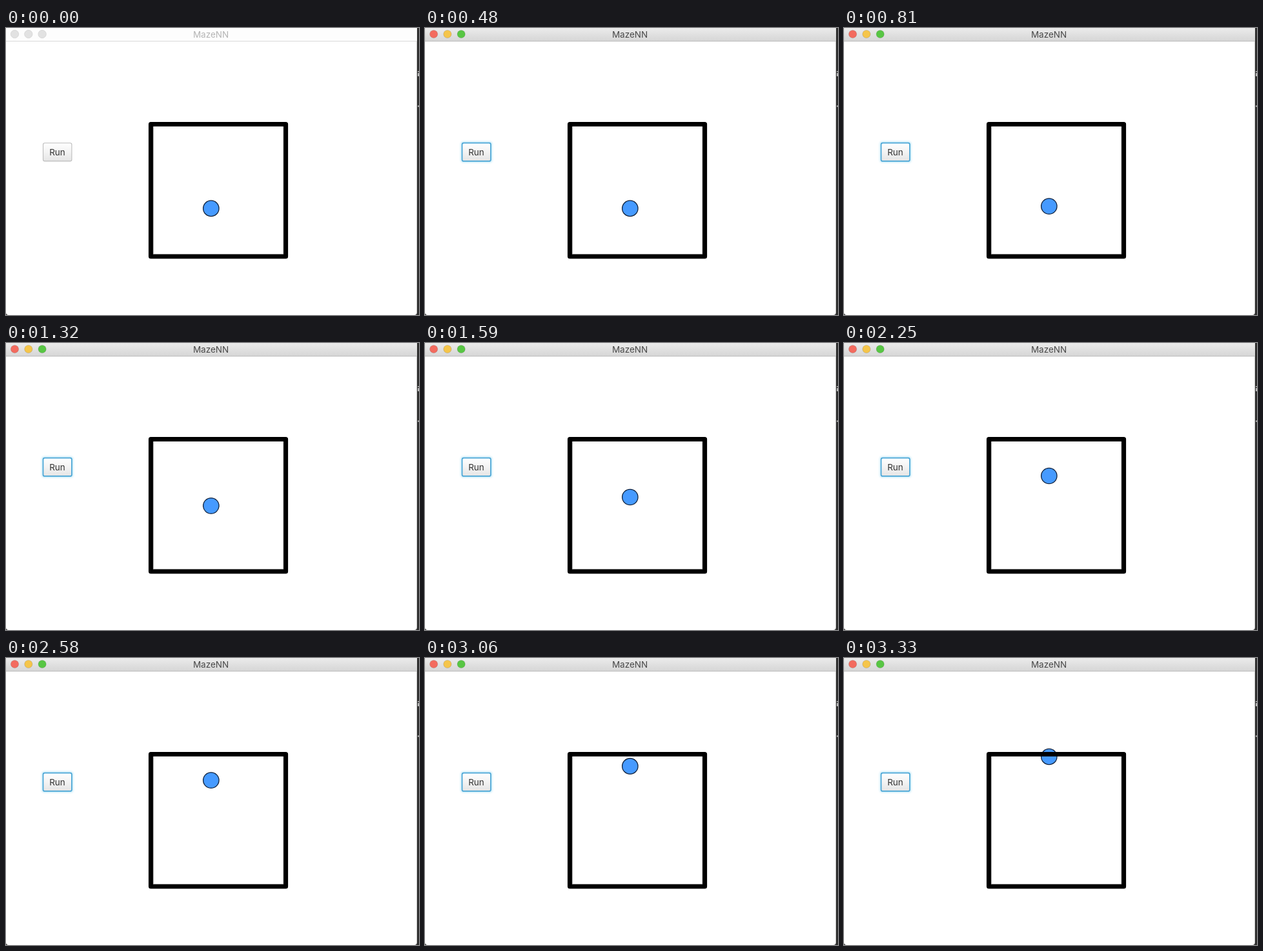
These frames come from a looping animation (640x446 px, 3360 ms). An HTML page:

```html
<!DOCTYPE html>
<html lang="en">
<head>
<meta charset="utf-8">
<title>MazeNN</title>
<style>
  html, body { margin: 0; width: 100%; height: 100%; overflow: hidden; background: #fff; }
  svg { display: block; width: 100%; height: 100%; }
  text { font-family: Inter, Roboto, sans-serif; font-size: 13.5px; text-anchor: middle; }
</style>
</head>
<body>
<svg viewBox="0 0 640 446">
  <defs>
    <linearGradient id="bar" x2="0" y2="1">
      <stop stop-color="#ebebeb"/><stop offset="1" stop-color="#d5d5d5"/>
    </linearGradient>
    <linearGradient id="face" x2="0" y2="1">
      <stop stop-color="#fff"/><stop offset=".5" stop-color="#f3f3f3"/><stop offset="1" stop-color="#e5e5e5"/>
    </linearGradient>
    <filter id="soft" x="-20%" y="-30%" width="140%" height="160%"><feGaussianBlur stdDeviation="1.5"/></filter>
  </defs>

  <rect width="640" height="446" fill="#303030"/>
  <g fill="#bbb">
    <rect x="638" y="67" width="2" height="1.5"/>
    <rect x="638" y="70" width="2" height="5"/>
    <rect x="638" y="120.5" width="2" height="2"/>
  </g>
  <rect y="-6" width="636.8" height="452" rx="4" fill="#fff"/>

  <rect id="title" width="636.8" height="21"/>
  <path id="rule" d="M0 20.5H636.8"/>
  <g id="lights"></g>
  <text id="name" x="317.5" y="14.8">MazeNN</text>

  <rect id="glow" x="55.5" y="176.5" width="48.5" height="32.5" rx="4" fill="#bfe8f7" filter="url(#soft)"/>
  <rect id="button" x="57.5" y="178.7" width="44.4" height="28.2" rx="2.5" fill="url(#face)"/>
  <text x="79.5" y="197.6" fill="#333">Run</text>

  <circle id="ball" cx="317.8" r="12.2" fill="#469aff" stroke="#10203a" stroke-width="1.3"/>
  <path d="M228.3 153V351M430 153V351" stroke="#aaa"/>
  <rect x="224.4" y="149.4" width="209.2" height="205.6" fill="none" stroke="#000" stroke-width="7" stroke-linejoin="round"/>
</svg>
<script>
const LOOP = 3360, STEP = 30, ACTIVE_AT = 480;
const LIGHTS = ['#f36b5f', '#f5c54a', '#58c644'];
const CLIMB = [[0, 280.4], [735, 280.4], [810, 277], [1320, 253], [1890, 224.5],
  [2580, 190], [3060, 168.2], [3330, 153.4]];

const $ = id => document.getElementById(id);
const set = (el, attrs) => Object.entries(attrs).forEach(([k, v]) => el.setAttribute(k, v));

const lights = LIGHTS.map((_, i) => {
  const dot = document.createElementNS('http://www.w3.org/2000/svg', 'circle');
  set(dot, { cx: 13.5 + i * 21.3, cy: 9.5, r: 6.1 });
  return $('lights').appendChild(dot);
});

function ballY(t) {
  const i = Math.max(1, CLIMB.findIndex(p => p[0] >= t));
  const [t0, y0] = CLIMB[i - 1], [t1, y1] = CLIMB[i];
  return y0 + (y1 - y0) * (t - t0) / (t1 - t0);
}

function draw(ms) {
  const t = Math.floor((ms % LOOP) / STEP) * STEP;
  const active = t >= ACTIVE_AT;
  set($('title'), { fill: active ? 'url(#bar)' : '#fdfdfd' });
  set($('rule'), { stroke: active ? '#bdbdbd' : '#d9d9d9' });
  set($('name'), { fill: active ? '#484848' : '#b4b4b4' });
  lights.forEach((dot, i) => set(dot, {
    fill: active ? LIGHTS[i] : '#e2e2e2',
    stroke: active ? 'rgba(0,0,0,.12)' : '#d8d8d8'
  }));
  set($('glow'), { visibility: active ? 'visible' : 'hidden' });
  set($('button'), { stroke: active ? '#4ba6d6' : '#bcbcbc', 'stroke-width': active ? 1.7 : 1.1 });
  set($('ball'), { cy: ballY(t) });
}

const start = performance.now();
function tick() {
  draw(performance.now() - start);
  requestAnimationFrame(tick);
}
tick();
</script>
</body>
</html>
```
